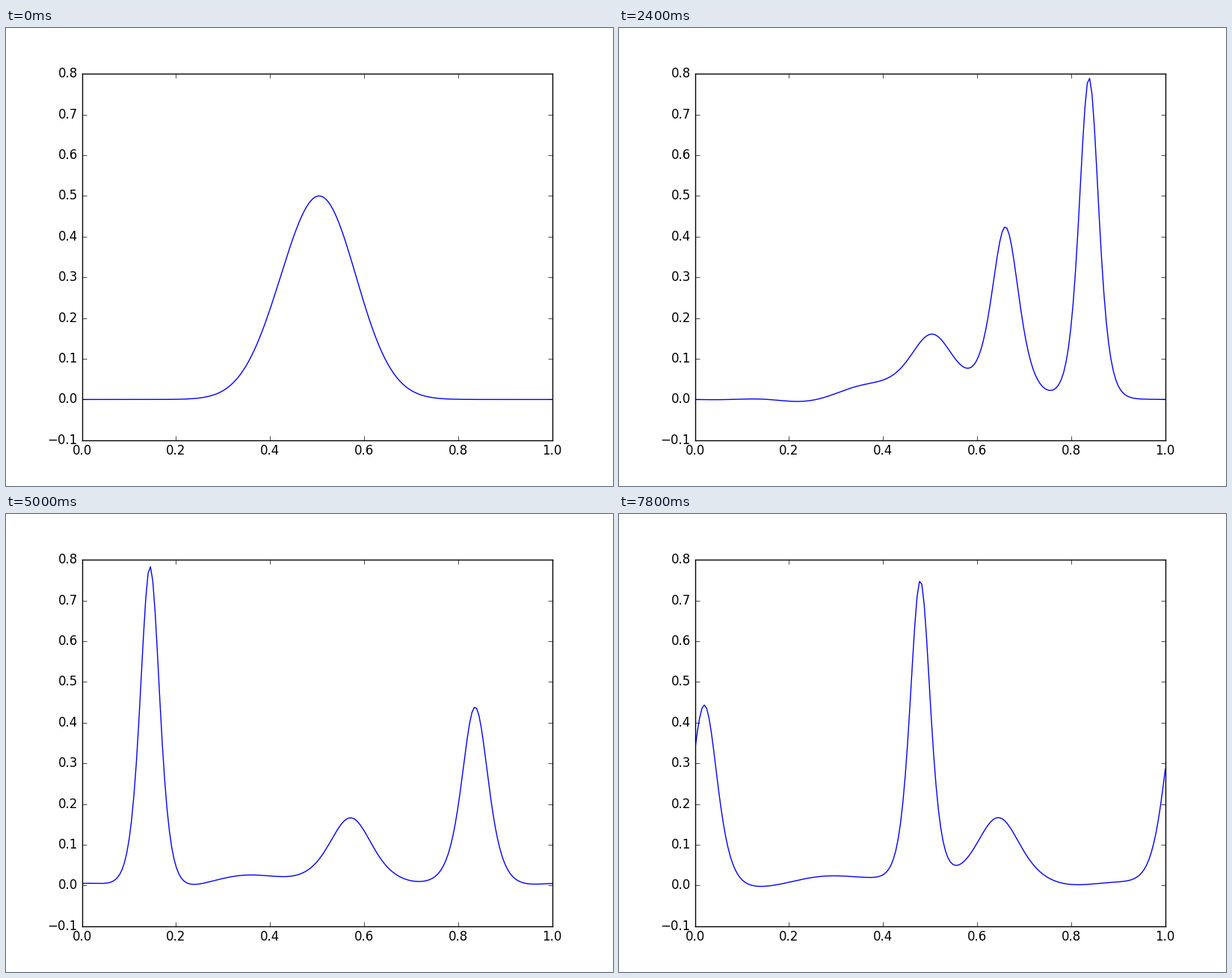
Animation, 812 px wide and 612 px high, one loop 8 s. Source, as a matplotlib script:

```python
import matplotlib.pyplot as plt
import numpy as np
from matplotlib.animation import FuncAnimation

plt.style.use("classic")
plt.rcParams.update({
    "font.family": "DejaVu Sans",
    "figure.facecolor": "white",
    "savefig.facecolor": "white",
})

FRAMES, INTERVAL = 40, 200
POINTS = 200
DISPERSION = 5e-5
DAMPING = 4.5e-13
FRAME_TIME = 0.0917
SUBSTEPS = 100
LEAD_IN = 10


def korteweg_de_vries(x):
    """Solve u_t + u u_x + b u_xxx = 0 on a ring, one row per frame."""
    period = x[1] * POINTS
    q = 2 * np.pi * np.fft.rfftfreq(POINTS, period / POINTS)
    dt = FRAME_TIME / SUBSTEPS
    half = np.exp((1j * DISPERSION * q**3 - DAMPING * q**6) * dt / 2)
    full = half**2

    def advect(v):
        return -0.5j * q * np.fft.rfft(np.fft.irfft(v, POINTS) ** 2)

    def step(v):
        # Fourth-order Runge-Kutta with an integrating factor
        a = advect(v)
        b = advect(half * (v + dt / 2 * a))
        c = advect(half * v + dt / 2 * b)
        d = advect(full * v + dt * half * c)
        return full * v + dt / 6 * (full * a + 2 * half * (b + c) + d)

    v = np.fft.rfft(0.5 * np.exp(-(((x - 0.5) / 0.08) ** 2) / 2))
    rows = []
    for n in range(FRAMES):
        for _ in range(SUBSTEPS if n else LEAD_IN):
            v = step(v)
        rows.append(np.fft.irfft(v, POINTS))
    return np.array(rows)


x = np.linspace(0, 1, POINTS)
waves = korteweg_de_vries(x)

# The tiny excess keeps the pixel size from rounding down
fig = plt.figure(figsize=(8.12 + 1e-6, 6.12 + 1e-6), dpi=100)
ax = fig.add_axes([0.125, 0.1, 0.775, 0.8])
ax.set_xlim(0, 1)
ax.set_ylim(-0.1, 0.8)
ax.set_xticks(np.arange(6) / 5)
ax.set_yticks(np.arange(-1, 9) / 10)
line, = ax.plot(x, waves[0], color="blue", lw=1)


def draw(n):
    line.set_ydata(waves[n])
    return line,


anim = FuncAnimation(fig, draw, frames=FRAMES, interval=INTERVAL,
                     repeat=True, repeat_delay=0)
plt.show()
```
